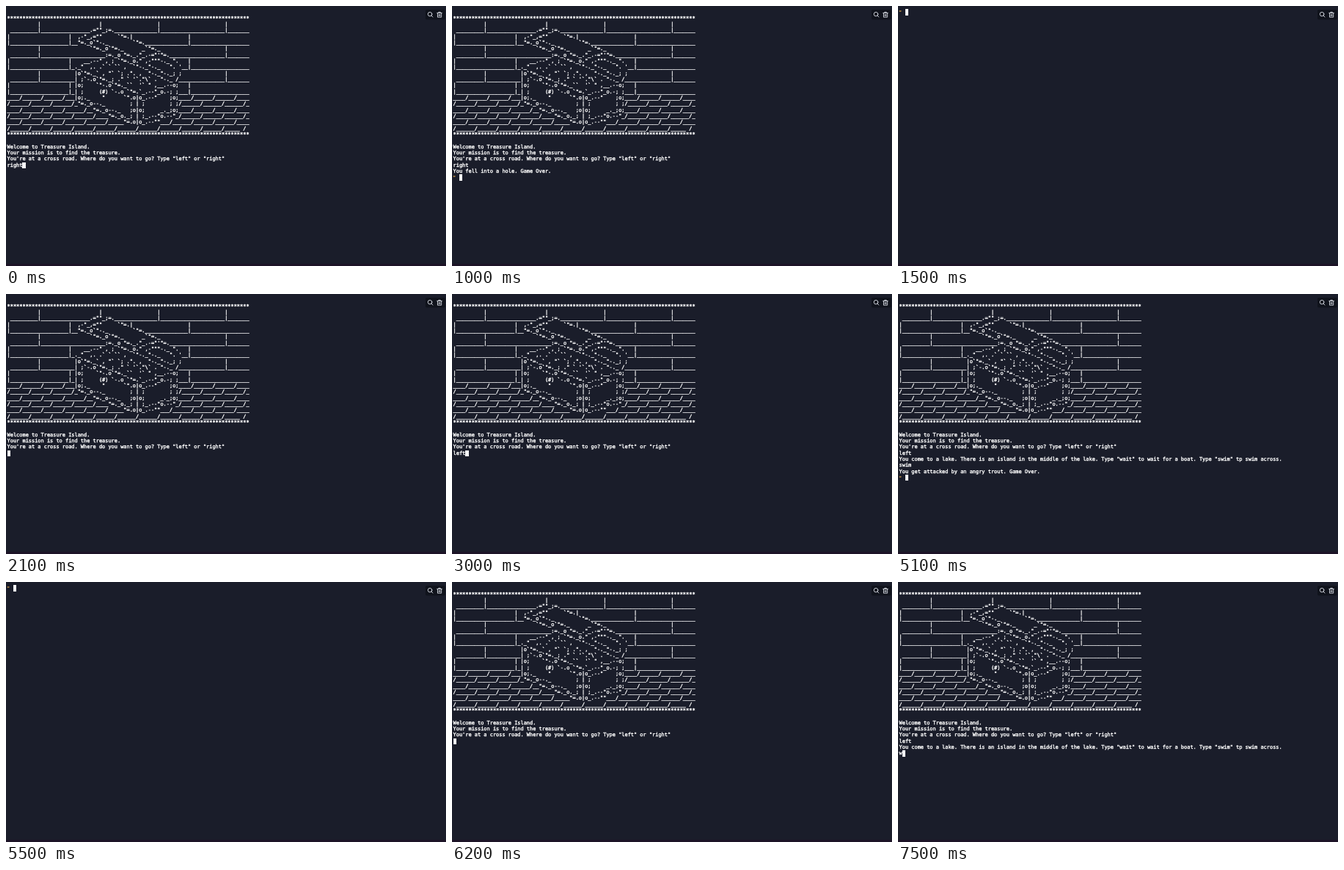
An HTML page for the animation above (8 s loop, 600x354 px).

```html
<!DOCTYPE html>
<html lang="en">
<head>
<meta charset="utf-8">
<title>Text adventure in a terminal</title>
<style>
html, body { margin: 0; width: 100%; height: 100%; overflow: hidden; background: #1a1d2a; }
#stage { position: relative; width: 600px; height: 354px; overflow: hidden; }
#stage::after { content: ""; position: absolute; left: 0; right: 0; bottom: 0; height: 3px; background: #1d1427; }
pre {
  position: absolute; left: 1.6px; top: 4.2px; margin: 0;
  font: 6.957px/8.34px "DejaVu Sans Mono", monospace;
  font-variant-ligatures: none; text-rendering: geometricPrecision;
  color: #fff; -webkit-text-stroke: .36px;
}
.caret, .prompt { display: inline-block; height: 8.34px; vertical-align: top; }
.caret { width: 4.3px; background: #f8f8fa; }
.prompt { width: 8.38px; font-size: 5.8px; color: #b58c48; }
svg { position: absolute; left: 572px; top: 5px; }
</style>
</head>
<body>
<div id="stage">
<pre><span id="game">
*******************************************************************************
          |                   |                  |                     |
 _________|________________.=""_;=.______________|_____________________|_______
|                   |  ,-"_,=""     `"=.|                  |
|___________________|__"=._o`"-._        `"=.______________|___________________
          |                `"=._o`"=._      _`"=._                     |
 _________|_____________________:=._o "=._."_.-="'"=.__________________|_______
|                   |    __.--" , ; `"=._o." ,-"""-._ ".   |
|___________________|_._"  ,. .` ` `` ,  `"-._"-._   ". '__|___________________
          |           |o`"=._` , "` `; .". ,  "-._"-._; ;              |
 _________|___________| ;`-.o`"=._; ." ` '`."\` . "-._ /_______________|_______
|                   | |o;    `"-.o`"=._``  '` " ,__.--o;   |
|___________________|_| ;     (#) `-.o `"=.`_.--"_o.-; ;___|___________________
____/______/______/___|o;._    "      `".o|o_.--"    ;o;____/______/______/____
/______/______/______/_"=._o--._        ; | ;        ; ;/______/______/______/_
____/______/______/______/__"=._o--._   ;o|o;     _._;o;____/______/______/____
/______/______/______/______/____"=._o._; | ;_.--"o.--"_/______/______/______/_
____/______/______/______/______/_____"=.o|o_.--""___/______/______/______/____
/______/______/______/______/______/______/______/______/______/______/_____ /
*******************************************************************************

Welcome to Treasure Island.
Your mission is to find the treasure.
You're at a cross road. Where do you want to go? Type "left" or "right"
</span><span id="log"></span></pre>
<svg width="27" height="14" fill="none" stroke="#cdd0d8" stroke-width=".95" stroke-linecap="round" stroke-linejoin="round">
  <rect width="27" height="13.5" rx="2" fill="#10131c" stroke="none"/>
  <circle cx="6.1" cy="6.1" r="2.8"/>
  <path d="M8.1 8.1 10 10M15.8 4.5H22.4M17.8 4.3V3.3H20.4V4.3M16.5 4.7V10.2H21.7V4.7M18.3 6.3V8.6M19.9 6.3V8.6"/>
</svg>
</div>
<script>
const LOOP = 8000;
const PROMPT = '<span class="prompt">➢</span>';
const CARET = '<span class="caret"></span>';
const HOLE = 'right\nYou fell into a hole. Game Over.\n';
const LAKE = 'left\nYou come to a lake. There is an island in the middle of the lake. ' +
  'Type "wait" to wait for a boat. Type "swim" tp swim across.\n';
const TROUT = LAKE + 'swim\nYou get attacked by an angry trout. Game Over.\n';

// [start in ms, game text shown, what follows it]
const steps = [
  [0, true, 'right'],
  [100, true, HOLE + PROMPT],
  [1500, false, PROMPT],
  [1900, false, ''],
  [2100, true, ''],
  [2500, true, 'l'],
  [3000, true, 'left'],
  [3100, true, LAKE],
  [3700, true, LAKE + 's'],
  [3900, true, LAKE + 'sw'],
  [4000, true, LAKE + 'swi'],
  [4100, true, LAKE + 'swim'],
  [4400, true, TROUT],
  [4500, true, TROUT + PROMPT],
  [5500, false, PROMPT],
  [6100, false, ''],
  [6200, true, ''],
  [6400, true, 'l'],
  [6500, true, 'le'],
  [6700, true, 'lef'],
  [6800, true, 'left'],
  [6900, true, LAKE],
  [7500, true, LAKE + 'w']
];

const game = document.getElementById('game');
const log = document.getElementById('log');
const start = performance.now();
let current;

function draw() {
  const t = Math.max(0, performance.now() - start) % LOOP;
  const step = steps.findLast(s => s[0] <= t);
  if (step !== current) {
    current = step;
    game.hidden = !step[1];
    log.innerHTML = step[2] + CARET;
  }
  requestAnimationFrame(draw);
}
draw();
</script>
</body>
</html>
```
